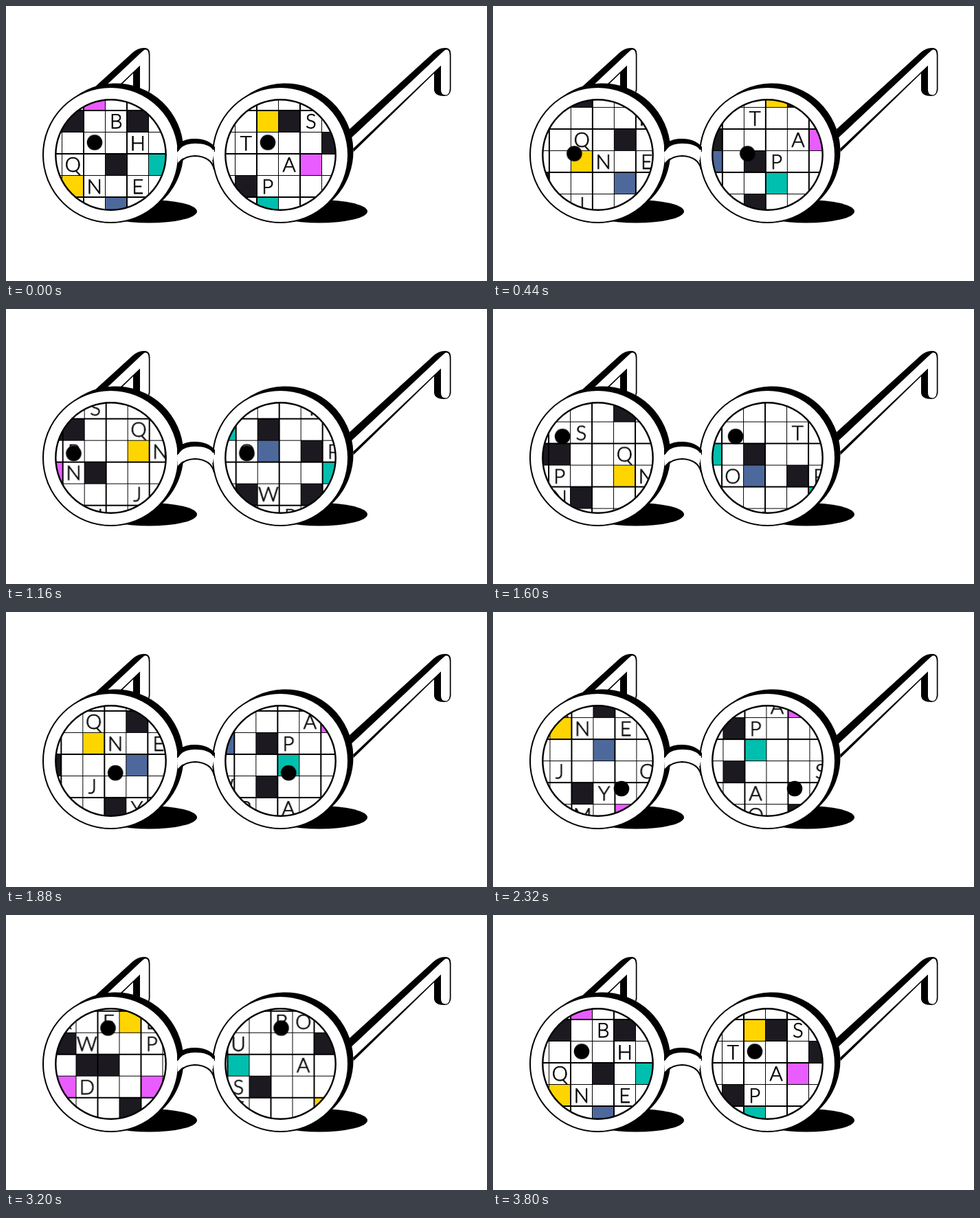
Write an HTML page without scripts that moves like this. It is 700x400 px and loops after 3840 ms.

```html
<!DOCTYPE html>
<html lang="en">
<head>
<meta charset="utf-8">
<title>Crossword glasses</title>
<style>
  html, body { margin: 0; width: 100%; height: 100%; overflow: hidden; background: #fff; }
  svg { display: block; width: 100%; height: 100%; }

  /* One crossword cell is 10 units; squares are thick strokes along a row. */
  .cells path { fill: none; stroke-width: 10; }
  .black { stroke: #1c1a20; }
  .pink { stroke: #e95cff; }
  .gold { stroke: #ffd500; }
  .teal { stroke: #00bfae; }
  .blue { stroke: #4d699c; }
  text {
    font: 300 9.3px Lato, Inter, sans-serif; text-anchor: middle; text-rendering: geometricPrecision;
    stroke: #000; stroke-width: .24; stroke-linejoin: round;
  }

  .grid, .pupil { animation: 3840ms cubic-bezier(.33, 0, .67, 1) infinite; }
  .grid { animation-name: pan; }
  .pupil { animation-name: look; }

  @keyframes pan {
    0%, 6.25%, 98.958%, 100% { transform: translate(81.5px, 152px); }
    19.792%, 25% { transform: translate(177px, 43.7px); }
    34.375%, 40.625% { transform: translate(177.3px, 134px); }
    54.167%, 59.375% { transform: translate(79.8px, 55px); }
    68.75%, 73.958% { transform: translate(165px, 168px); }
    87.5%, 92.708% { transform: translate(165px, 294px); }
  }
  @keyframes look {
    0%, 6.25%, 98.958%, 100% { transform: translate(129px, 198.5px); }
    19.792%, 25% { transform: translate(97px, 247px); }
    34.375%, 40.625% { transform: translate(99.5px, 184px); }
    54.167%, 59.375% { transform: translate(188.4px, 258.5px); }
    68.75%, 73.958% { transform: translate(148.5px, 214.5px); }
    87.5%, 92.708% { transform: translate(148.5px, 150px); }
  }
</style>
</head>
<body>
<svg viewBox="0 0 700 400">
  <defs>
    <!-- dashes of two very wide strokes make the grid lines -->
    <path id="net" d="M-100 20H140M20-100V140" fill="none" stroke="#000" stroke-width="240"
      stroke-dasharray=".5 9.5" stroke-dashoffset=".25" shape-rendering="crispEdges"/>
    <clipPath id="hole"><circle cx="152.5" cy="216.5" r="80"/></clipPath>
    <clipPath id="hole2"><circle cx="399.5" cy="216.5" r="80"/></clipPath>

    <g id="temple">
      <path d="M500 179L622 68Q630 61 638 61H641Q647.500 62 647.500 70V122Q646 131 638 131Q624 131 623 122V98L506 212Z"/>
      <path d="M497 197L628 74Q636 66 640 63.500Q645.800 62.500 645.800 72V121Q645 129.500 640 129.500Q633 129.500 633 122V86.500L505 207.500Z" fill="#fff"/>
    </g>
    <g id="rim">
      <path d="M152.500 216.500l7-5" stroke="#000" stroke-width="198" stroke-linecap="round"/>
      <circle cx="152.500" cy="216.500" r="98.500" fill="#fff" stroke="#000" stroke-width="2"/>
    </g>
    <ellipse id="shade" cx="208" cy="298.700" rx="70" ry="16.800"/>
    <circle id="edge" cx="152.500" cy="216.500" r="80.200" fill="none" stroke="#000" stroke-width="2.400"/>
  </defs>

  <use href="#shade"/>
  <use href="#shade" x="248"/>
  <use href="#temple" x="-438"/>
  <use href="#temple"/>
  <use href="#rim"/>
  <use href="#rim" x="247"/>

  <!-- bridge -->
  <path d="M249 203Q257 193 275 193Q294 193 304 205V212H249Z"/>
  <path d="M250 211Q256 199 275 199Q296 199 303 210L301 224Q290 218 275 218Q262 218 255 223L250 228Z" fill="#fff"/>
  <path d="M250 211Q256 199 275 199Q296 199 302 209M249 238Q252 219 275 218Q299 219 303 238" fill="none" stroke="#000" stroke-width="2"/>

  <!-- left lens -->
  <g clip-path="url(#hole)">
    <g class="grid">
      <g class="cells" transform="scale(3.15)">
        <path class="black" d="M-30-25h10M-20-15h20M0 5h10M30 5h10M-40 25h20M20 25h10M-20 45h10M10 65h10"/>
        <path class="pink" d="M-30-5h10M10-5h10M-40 45h10M30 75h10"/>
        <path class="gold" d="M0-35h10M0 35h10"/>
        <path class="teal" d="M40 25h10"/>
        <path class="blue" d="M20 45h10M-20 75h10"/>
        <use href="#net"/>
        <text x="-25 -5 15" y="-31.6">KFE</text>
        <text x="-15 15" y="-21.6">WP</text>
        <text x="-15" y="-1.6">D</text>
        <text x="25" y="8.4">B</text>
        <text x="-15 35" y="18.4">SH</text>
        <text x="5" y="28.4">Q</text>
        <text x="-25 15 35" y="38.4">PNE</text>
        <text x="-25" y="48.4">N</text>
        <text x="-35 4.5 45" y="58.2">NJO</text>
        <text x="-15 25" y="68.4">HY</text>
        <text x="-5 15" y="78.4">LM</text>
      </g>
    </g>
    <circle class="pupil" r="11.3"/>
  </g>

  <!-- right lens -->
  <g clip-path="url(#hole2)">
    <g transform="translate(252)">
      <g class="grid">
        <g class="cells" transform="scale(3.15)">
          <path class="black" d="M10-25h10M-20-5h10M20 5h10M40 15h10M-20 25h10M0 35h10M-30 55h10M0 55h10M30 75h10"/>
          <path class="pink" d="M30 25h10"/>
          <path class="gold" d="M10 5h10"/>
          <path class="teal" d="M-30-15h10M-40 25h10M10 45h10"/>
          <path class="blue" d="M-20 35h10M-30 75h10"/>
          <use href="#net"/>
          <text x="-5 5" y="-31.6">BO</text>
          <text x="-25" y="-21.6">U</text>
          <text x="5" y="-11.6">A</text>
          <text x="-25" y="-1.6">S</text>
          <text x="-25 35" y="8.4">FS</text>
          <text x="5" y="18.4">T</text>
          <text x="25" y="28.4">A</text>
          <text x="-25 15" y="38.4">OP</text>
          <text x="-35 -15 45" y="58.2">DWS</text>
          <text x="-5 15" y="68.4">PA</text>
          <text x="15" y="78.4">O</text>
        </g>
      </g>
      <circle class="pupil" r="11.3"/>
    </g>
  </g>

  <use href="#edge"/>
  <use href="#edge" x="247"/>
</svg>
</body>
</html>
```
